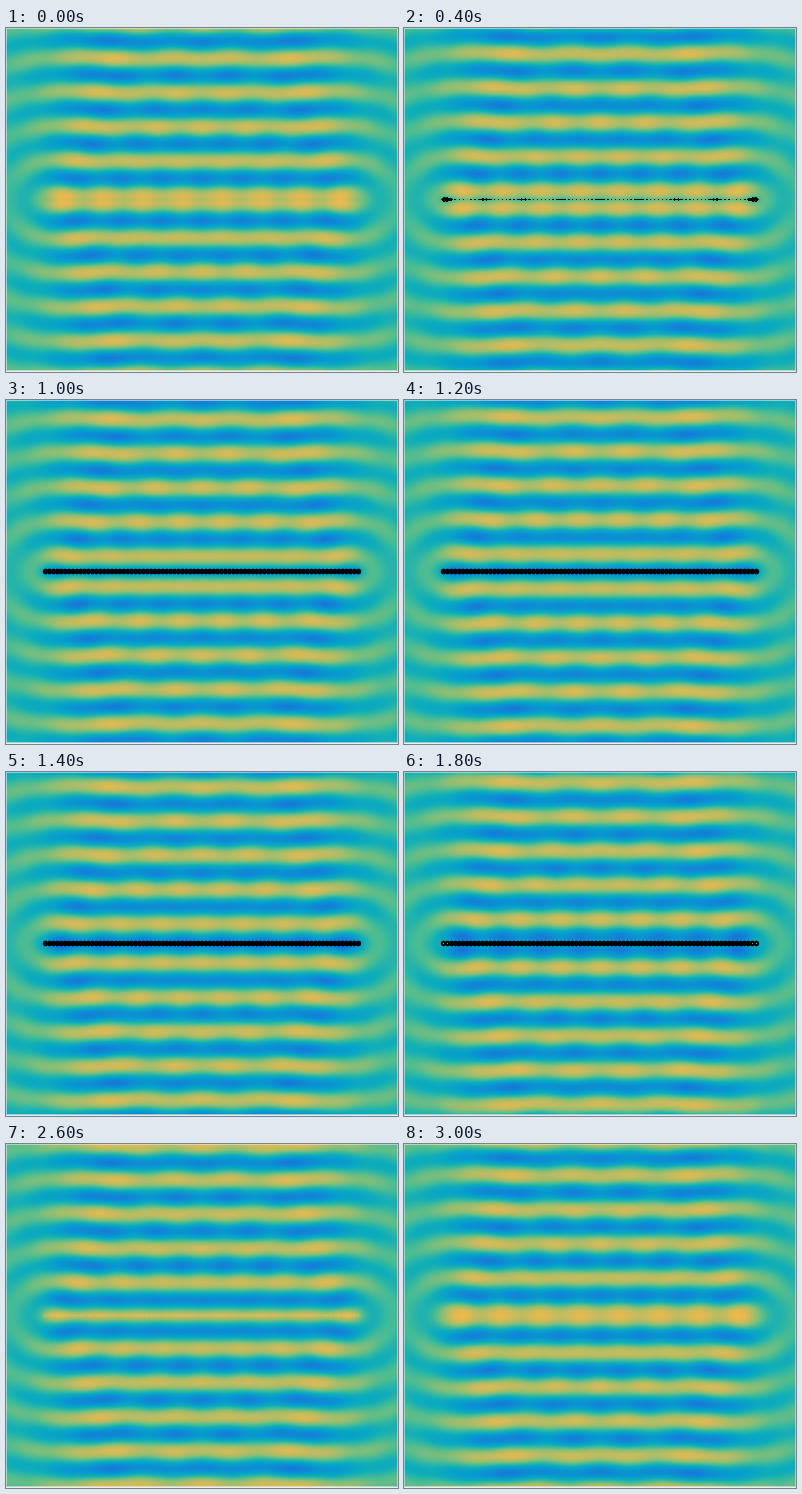
Recreate the animation shown at these times as a matplotlib script. Size 392 px wide and 344 px high, loop 3100 ms.

```python
import numpy as np
import matplotlib.pyplot as plt
from matplotlib.animation import FuncAnimation
from matplotlib.colors import LinearSegmentedColormap

W, H, DPI = 392, 344, 100
FRAMES, INTERVAL = 31, 100
SPAN = 10            # wavelengths across the field, both ways
LOW, HIGH = -16, 14  # heights of the first and last colour
DOT_RADIUS = 2.8     # pixels
DOT_HEIGHT = 1.2     # the surface hides the dots where it is higher
PALE = 0.94          # grey of the thin surround

colours = LinearSegmentedColormap.from_list("sea_to_sand", [
    "#0268e1", "#1481d6", "#079ccf", "#0faeb9",
    "#42bb98", "#87bf77", "#c0bc60", "#f1b94a"])

# Pixel centres measured in wavelengths from the middle of the field,
# which starts half a pixel in and leaves the bottom row free
field_w, field_h = W - 1, H - 2
scale_x, scale_y = field_w / SPAN, field_h / SPAN
x = (np.arange(W) - field_w / 2) / scale_x
y = ((np.arange(H) - field_h / 2) / scale_y)[:, None]
sources = np.linspace(-4, 4, 81)

# Complex amplitude of all point sources, and the dots that mark them
wave = np.zeros((H, W), complex)
dots = np.zeros((H, W))
for s in sources:
    r = np.maximum(np.hypot(x - s, y), 0.005)
    wave += np.exp(2j * np.pi * r) / np.sqrt(r)
    gap = np.hypot((x - s) * scale_x, y * scale_y)
    dots = np.maximum(dots, np.clip(DOT_RADIUS + 0.5 - gap, 0, 1))

edge = np.zeros((H, W, 1))
edge[0] = edge[-2] = 0.55
edge[:, [0, -1]] = 0.55
edge[-1] = 1


def picture(i):
    u = (wave * np.exp(-2j * np.pi * i / FRAMES)).imag
    rgb = colours((u - LOW) / (HIGH - LOW))[..., :3]
    rgb = rgb * (1 - dots * (u < DOT_HEIGHT))[..., None]
    return rgb * (1 - edge) + PALE * edge


fig = plt.figure(figsize=(W / DPI, H / DPI), dpi=DPI)
ax = fig.add_axes([0, 0, 1, 1])
ax.axis("off")
image = ax.imshow(picture(0), aspect="auto", interpolation="nearest")


def update(i):
    image.set_data(picture(i))
    return [image]


anim = FuncAnimation(fig, update, frames=FRAMES, interval=INTERVAL,
                     repeat=True, repeat_delay=0)
plt.show()
```
